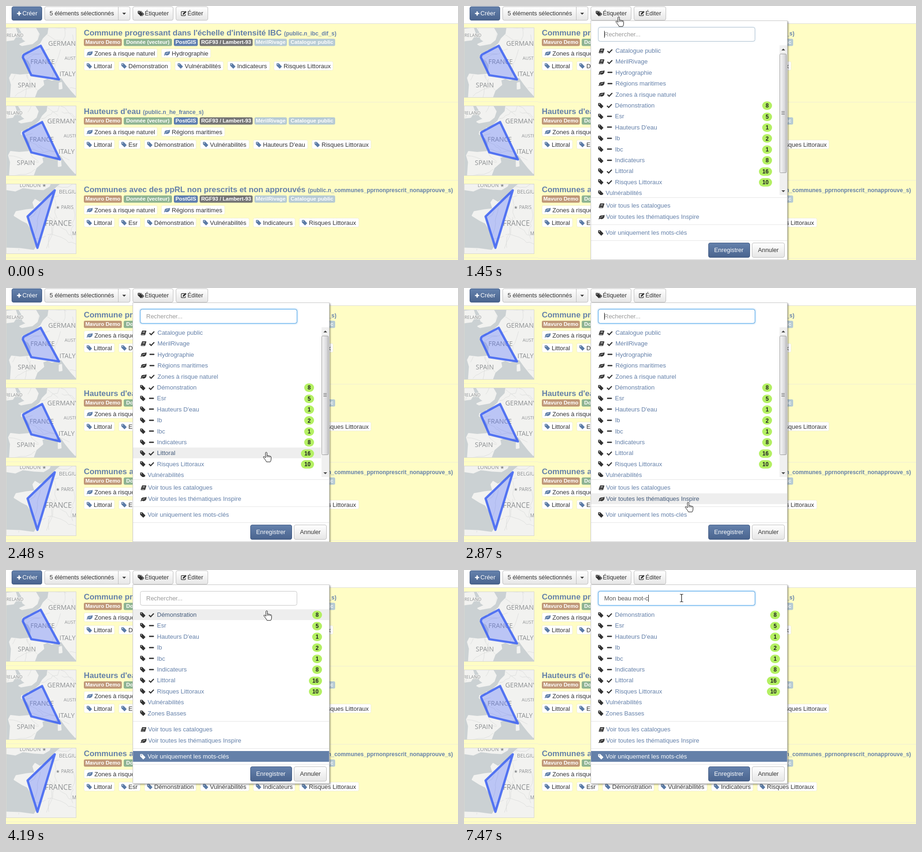
Write an HTML page that moves like this. It is 964 by 543 pixels and loops after 8000 ms.

```html
<!DOCTYPE html>
<html lang="fr">
<head>
<meta charset="utf-8">
<title>Étiqueter</title>
<style>
html, body { margin: 0; width: 100%; height: 100%; overflow: hidden; background: #fff; }
svg { display: block; }
text { font-family: "Liberation Sans", Arial, sans-serif; white-space: pre; }
.map text { font-family: "Open Sans", sans-serif; fill: #8b8e90; stroke: #f4f4f2; stroke-width: 2px; paint-order: stroke; }
</style>
</head>
<body>
<svg id="stage" width="964" height="543" viewBox="0 0 964 543">
  <defs>
    <linearGradient id="light" x2="0" y2="1"><stop stop-color="#fff"/><stop offset="1" stop-color="#e6e6e6"/></linearGradient>
    <linearGradient id="blue" x2="0" y2="1"><stop stop-color="#6481ac"/><stop offset="1" stop-color="#4a648e"/></linearGradient>
    <linearGradient id="thumb"><stop stop-color="#f5f5f5"/><stop offset=".5" stop-color="#e4e4e6"/><stop offset="1" stop-color="#c9c9cc"/></linearGradient>
    <clipPath id="listClip"><rect x="271" y="84" width="418" height="320"/></clipPath>
    <clipPath id="tile"><rect width="150" height="150"/></clipPath>
    <filter id="shadow" x="-5%" y="-5%" width="110%" height="110%"><feDropShadow dx="2" dy="2" stdDeviation="1.6" flood-opacity=".35"/></filter>
    <filter id="glow" x="-5%" y="-30%" width="110%" height="160%"><feGaussianBlur stdDeviation="1.6"/></filter>
  </defs>
  <g id="page"></g>
  <rect id="press" x="270" y="1" width="87" height="30" rx="3.5"/>
  <g id="menu"></g>
  <g id="cursor"></g>
</svg>
<script>
const $ = id => document.getElementById(id);
const LINK = '#6480a9', HOVER = '#435a7a', DARK = '#333', YELLOW = '#fffdc5', LOOP = 8000;

const rect = (x, y, w, h, fill, more = '') =>
  `<rect x="${x}" y="${y}" width="${w}" height="${h}" fill="${fill}" ${more}/>`;
const text = (x, y, s, fill = DARK, size = 13, more = '') =>
  `<text x="${x}" y="${y}" fill="${fill}" font-size="${size}" ${more}>${s}</text>`;
const path = (d, fill, more = '') => `<path d="${d}" fill="${fill}" ${more}/>`;
const line = (x1, x2, y, color) => rect(x1, y, x2 - x1, 1, color);

const pen = document.createElement('canvas').getContext('2d');
pen.font = '13px "Liberation Sans", Arial, sans-serif';
const widthOf = s => pen.measureText(s).width;

// Icons are drawn on a 12 px square centred on cy
const TAG = 'M0 1.6Q0 .6 1 .6H4.8L10.9 6.7Q11.5 7.4 10.9 8L7.4 11.4Q6.8 12 6.1 11.4L0 5.4ZM2.6 2.1A1 1 0 1 0 2.6 4.1 1 1 0 1 0 2.6 2.1Z';
const ICONS = {
  tag: c => path(TAG, c, 'fill-rule="evenodd"'),
  tags: c => path('M6 .6H7.2L13.3 6.8Q13.8 7.4 13.3 8L9.6 11.7 8.6 11.2 12 7.5Z', c) + ICONS.tag(c),
  leaf: c => path('M12.4 1.2C13.4 5.5 11.5 10.2 6.5 10.4 4.6 10.4 3.4 9.9 2.6 9.4 2 10 1.7 11 1 11 .3 11-.2 10.2.2 9.6.6 9 1.3 8.6 1.4 8 .7 5 3 3 6 2.8 9 2.6 10.8 2.8 12.4 1.2Z', c) +
    path('M3.2 8C4.8 6.2 6.5 5.4 9.4 5.3', 'none', 'stroke="#fff" stroke-width=".9"'),
  book: c => path('M3.4 1H11.4Q12.6 1.2 12.2 2.4L10 9.8Q9.7 11 8.6 11H1.6Q0 10.6.5 9Z', c) +
    path('M4.6 3.4H9.6M4 5.2H9M1.6 9.4H8.4', 'none', 'stroke="#fff" stroke-width=".8"'),
  check: c => path('M1 6.4 4.6 9.8 11.2 3', 'none', `stroke="${c}" stroke-width="2.4"`),
  dash: c => rect(1, 4.6, 10.5, 2.6, c, 'rx="1"'),
  plus: c => path('M5 1.5V10.5M.5 6H9.5', 'none', `stroke="${c}" stroke-width="2.7"`),
  edit: c => path('M8 2H2Q.8 2 .8 3.2V9.4Q.8 10.6 2 10.6H8.4Q9.6 10.6 9.6 9.4V7.6', 'none', `stroke="${c}" stroke-width="1.3"`) +
    path('M4 8.4V6.2L9.8.6 12 2.7 6.2 8.4Z', c)
};
const icon = (name, x, cy, color) => `<g transform="translate(${x} ${Math.round(cy - 6)})">${ICONS[name](color)}</g>`;

function button(x, y, w, h, label, tx, blue) {
  const [fill, edge, ink] = blue ? ['url(#blue)', '#3f5880', '#fff'] : ['url(#light)', '#bdbdbd', DARK];
  return rect(x + .5, y + .5, w - 1, h - 1, fill, `rx="3.5" stroke="${edge}"`) +
    text(tx, y + h / 2 + 4, label, ink, 12.8);
}

const toolbar = () => rect(0, 0, 964, 38, '#fff') + line(0, 964, 37, '#ddd') +
  button(12, 1, 65, 30, 'Créer', 35, true) + icon('plus', 23, 16, '#fff') +
  button(82, 1, 183, 30, '5 éléments sélectionnés', 93) + rect(239, 1, 1, 30, '#bdbdbd') +
  path('M248 14.5H256L252 18.5Z', DARK) +
  button(270, 1, 87, 30, 'Étiqueter', 296) + icon('tags', 281, 16, DARK) +
  button(362, 1, 69, 30, 'Éditer', 387) + icon('edit', 373, 16, DARK);

const EUROPE = {
  land: 'M92 0 90 14 80 24 74 35 66 42 58 50 50 50 48 57 36 57 35 62 48 70 54 80 53 100 30 102 12 100 8 108 12 122 10 150H60L66 134 80 122 78 112 88 108 98 112 110 108 118 106 128 120 140 135 150 146V0Z' +
    'M28 0H62L70 14 66 26 56 34 34 38 30 36 44 30 36 24 34 10ZM0 4 20 2 24 14 16 26 0 28ZM114 119 118 118 119 130 114 131Z',
  labels: [[1, 20, 'RELAND', 9.5], [90, 39, 'GERMANY', 14], [52, 78, 'FRANCE', 14], [125, 69, 'AUSTRIA', 9.5], [114, 104, 'ITALY', 14], [25, 128, 'SPAIN', 14]]
};
const CHANNEL = {
  land: 'M150 0H118L104 12 98 24 84 34 72 40 62 34 58 40 62 54 44 56 22 60 18 68 34 78 46 84 56 100 60 118 66 134 60 143 30 139 0 138V150H150ZM0 0V12L20 15 36 8 60 11 80 12 92 5 94 0Z',
  labels: [[29, 7, 'LONDON ★', 10.5], [113, 21, 'BELGIUM', 11], [106, 54, '★ PARIS', 10], [83, 90, 'FRANCE', 15.5], [141, 110, 'MA', 10]]
};

// Faint administrative borders, as seeded wandering lines
function borders(seed) {
  const rnd = () => (seed = seed * 16807 % 2147483647) / 2147483647;
  let d = '';
  for (let i = 0; i < 16; i++) {
    let x = rnd() * 150, y = rnd() * 150;
    const a = rnd() * 6.28;
    d += `M${x} ${y}`;
    for (let k = 0; k < 7; k++) {
      x += 9 * Math.cos(a) + rnd() * 10 - 5;
      y += 9 * Math.sin(a) + rnd() * 10 - 5;
      d += `L${x.toFixed(1)} ${y.toFixed(1)}`;
    }
  }
  return d;
}

function map(i, base, dx, dy, zone) {
  return `<g class="map" transform="translate(0 ${46 + 167 * i})" clip-path="url(#tile)">` +
    rect(0, 0, 150, 150, '#cbd1d3') +
    `<g transform="translate(${dx} ${dy})"><clipPath id="land${i}"><path d="${base.land}"/></clipPath>` +
    path(base.land, '#f2f2f0', 'stroke="#f2f2f0" stroke-width="3" stroke-linejoin="round"') +
    path(borders(i + 41), 'none', `stroke="#dcdddc" stroke-width=".9" clip-path="url(#land${i})"`) +
    base.labels.map(([x, y, s, size]) => text(x, y, s, '', size)).join('') + '</g>' +
    path(zone, '#4a68ff', 'fill-opacity=".33" stroke="#3c62f2" stroke-opacity=".85" stroke-width="4.8" stroke-linejoin="round"') +
    rect(.5, .5, 149, 149, 'none', 'stroke="#d8d8d0"') + '</g>';
}

const BADGES = [
  [166, 81, 'Mavuro Demo', '#bf9878'], [251, 103, 'Donnée (vecteur)', '#8fb492'], [358, 51, 'PostGIS', '#5f7faf'],
  [413, 113, 'RGF93 / Lambert-93', '#757575'], [530, 69, 'MérilRivage', '#b7cbd4'], [603, 99, 'Catalogue public', '#b7cbd4']
];
const RECORDS = [
  { title: "Commune progressant dans l'échelle d'intensité IBC", table: '(public.n_ibc_dif_s)', tableX: 593, end: 704,
    themes: ['Zones à risque naturel', 'Hydrographie'],
    tags: ['Littoral', 'Démonstration', 'Vulnérabilités', 'Indicateurs', 'Risques Littoraux'],
    map: [EUROPE, 0, 0, 'M74 39 38 58Q36 60 36 64L54 102 113 111Z'] },
  { title: "Hauteurs d'eau", table: '(public.n_he_france_s)', tableX: 292, end: 423,
    themes: ['Zones à risque naturel', 'Régions maritimes'],
    tags: ['Littoral', 'Esr', 'Démonstration', 'Vulnérabilités', "Hauteurs D'eau", 'Risques Littoraux'],
    map: [EUROPE, -2, -1.5, 'M77 35 37 57Q36 59 37 61L54 100 115 115Z'] },
  { title: 'Communes avec des ppRL non prescrits et non approuvés', table: '(public.n_communes_pprnonprescrit_nonapprouve_s)', tableX: 644, end: 954,
    themes: ['Zones à risque naturel', 'Régions maritimes'],
    tags: ['Littoral', 'Esr', 'Démonstration', 'Vulnérabilités', 'Indicateurs', 'Risques Littoraux'],
    map: [CHANNEL, 0, 0, 'M104 14 46 70 67 137Z'] }
];
const recordY = i => Math.round(167.5 * i);

function chips(names, kind, cy) {
  const [lead, pad] = kind === 'leaf' ? [22.5, 28] : [21, 27];
  let next = 166;
  return names.map(s => {
    const x = Math.round(next);
    next += widthOf(s) + pad + 8;
    const w = Math.round(next) - x - 8;
    return rect(x + .5, cy - 9.5, w - 1, 19, '#fff', 'rx="3" stroke="#f1efd2"') +
      icon(kind, x + 6, cy, '#5b7ba6') + text(x + lead, cy + 5, s);
  }).join('');
}

function record(r, i) {
  const y = recordY(i), foot = 205 + 167 * i;
  return map(i, ...r.map) +
    `<g id="title${i}" fill="${LINK}" font-weight="bold">` +
    `<text x="166" y="${y + 63}" font-size="16.9">${r.title}</text>` +
    `<text x="${r.tableX}" y="${y + 63}" font-size="11.9">${r.table}</text></g>` +
    BADGES.map(([x, w, s, fill]) => rect(x, y + 70, w, 15.5, fill, 'rx="3"') +
      text(x + w / 2, y + 81.3, s, '#fff', 11.3, 'font-weight="bold" text-anchor="middle"')).join('') +
    chips(r.themes, 'leaf', y + 101) + chips(r.tags, 'tag', y + 128) +
    line(0, 158, foot - 1, '#efedd6') + line(158, 964, foot, '#efedd6');
}

$('page').innerHTML = rect(0, 38, 964, 505, YELLOW) + toolbar() + RECORDS.map(record).join('');

// Menu
const ROWS = [
  ['book', 'check', 'Catalogue public'], ['book', 'check', 'MérilRivage'],
  ['leaf', 'dash', 'Hydrographie'], ['leaf', 'dash', 'Régions maritimes'], ['leaf', 'check', 'Zones à risque naturel'],
  ['tag', 'check', 'Démonstration', 8], ['tag', 'dash', 'Esr', 5], ['tag', 'dash', "Hauteurs D'eau", 1],
  ['tag', 'dash', 'Ib', 2], ['tag', 'dash', 'Ibc', 1], ['tag', 'dash', 'Indicateurs', 8],
  ['tag', 'check', 'Littoral', 16], ['tag', 'check', 'Risques Littoraux', 10],
  ['tag', '', 'Vulnérabilités'], ['tag', '', 'Zones Basses']
];
const LINKS = [['book', 'Voir tous les catalogues', 426.5], ['leaf', 'Voir toutes les thématiques Inspire', 450.5], ['tag', 'Voir uniquement les mots-clés', 484.5]];
const OPEN = 1450, FILTERED = 3490, REFOCUS = 4900, PITCH = 23.4;
const TYPED = [5680, 5910, 5990, 6230, 6380, 6460, 6610, 6610, 6770, 7000, 7075, 7150, 7390, 7470];
const PHRASE = 'Mon beau mot-c';

const rowY = i => 95.6 + i * PITCH;
const over = (x, y, cy) => x > 271 && x < 689 && Math.abs(y - cy) <= 11.7;

function menuRow([kind, mark, name, count], i, right, hover) {
  const cy = rowY(i), shift = kind === 'tag' ? 0 : 1;
  let s = hover ? rect(271, Math.round(cy - 11.7), right - 271, 23, '#eee') : '';
  s += icon(kind, 286 + shift, cy, DARK);
  if (mark) s += icon(mark, 304 + shift, cy, DARK);
  s += text((mark ? 322 : 302) + shift, Math.round(cy + 4.4), name, hover ? HOVER : LINK);
  if (count) {
    const w = count > 9 ? 28 : 21, x = right - 15 - w;
    s += rect(x, Math.round(cy - 8.3), w, 18, '#b4f063', 'rx="9"') +
      text(x + w / 2, Math.round(cy + 4.8), count, '#222', 12, 'font-weight="bold" text-anchor="middle"');
  }
  return s;
}

function field(t) {
  const focusAt = t < FILTERED ? OPEN : REFOCUS;
  const focused = t < FILTERED || t >= REFOCUS;
  const glow = focused ? Math.min(1, (t - focusAt + 40) / 200) : 0;
  const count = TYPED.filter(k => k <= t).length;
  const since = count ? TYPED[count - 1] : focusAt;
  const typed = PHRASE.slice(0, count);
  const caret = focused && Math.floor((t - since) / 535) % 2 === 0;
  const box = 'x="286.5" y="45.5" width="334" height="30" rx="4"';
  return `<rect ${box} fill="none" stroke="#52a8ec" stroke-width="3" opacity="${.5 * glow}" filter="url(#glow)"/>` +
    `<rect ${box} fill="#fff" stroke="#c4c4c4"/><rect ${box} fill="none" stroke="#52a8ec" opacity="${glow}"/>` +
    (count ? text(299, 65, typed, '#555') : text(299, 65, 'Rechercher...', '#999')) +
    (caret ? rect(Math.round(299 + widthOf(typed)), 53, 1, 15, '#222') : '');
}

const scrollbar = () => rect(673, 84, 16, 320, '#f0f0f0') +
  path('M677 95H685L681 91ZM677 394H685L681 398Z', '#444') +
  rect(673.5, 102.5, 14, 254, 'url(#thumb)', 'rx="2" stroke="#989898"') +
  [225, 228, 231].map(y => line(677, 684, y, '#666')).join('');

function menuFoot(full, lift, x, y) {
  let s = [409, 467, 501].map(v => line(271, 689, v, '#e5e5e5')).join('');
  LINKS.forEach(([kind, name, cy], i) => {
    const active = !full && i === 2, hover = over(x, y + lift, cy);
    if (active || hover) s += rect(271, cy - 11.5, 418, 23, active ? LINK : '#eee');
    s += icon(kind, kind === 'tag' ? 286 : 287, cy, active ? '#fff' : DARK) +
      text(kind === 'tag' ? 302 : 303, cy + 4.5, name, active ? '#fff' : hover ? HOVER : LINK);
  });
  return `<g transform="translate(0 ${-lift})">${s}` +
    button(521, 506, 89, 32, 'Enregistrer', 533.5, true) + button(614, 506, 70, 32, 'Annuler', 627) + '</g>';
}

function menu(t, x, y) {
  const full = t < FILTERED, lift = full ? 0 : 86, right = full ? 672 : 689;
  const rows = full ? ROWS : ROWS.slice(5);
  return rect(270.5, 31.5, 419, 511 - lift, '#fff', 'stroke="#c8c8c8" filter="url(#shadow)"') + field(t) +
    '<g clip-path="url(#listClip)">' +
    rows.map((r, i) => menuRow(r, i, right, y < 404 && x < right && over(x, y, rowY(i)))).join('') + '</g>' +
    (full ? scrollbar() : '') + menuFoot(full, lift, x, y);
}

// Pointer
const TRACK = [
  [150, 520, 453], [850, 330, 23], [1700, 330, 23], [2000, 550, 189], [2550, 556, 374], [2600, 556, 374],
  [2870, 478, 458], [3300, 498, 485], [3430, 500, 477], [3490, 500, 477], [4190, 557, 87], [4260, 488, 67], [4490, 464, 60]
];
function pointer(t) {
  const k = TRACK.findIndex(p => p[0] > t);
  if (k <= 0) return TRACK[k < 0 ? TRACK.length - 1 : 0].slice(1);
  const [a, b] = [TRACK[k - 1], TRACK[k]], f = (t - a[0]) / (b[0] - a[0]);
  return [a[1] + (b[1] - a[1]) * f, a[2] + (b[2] - a[2]) * f];
}
const CURSORS = {
  arrow: path('M0 0V16L3.7 12.6 6.3 18.5 8.7 17.4 6.2 11.8H11.3Z', '#fff', 'stroke="#111"'),
  hand: path('M-1.6 1Q0-1.2 1.6 1V7.4Q3.2 6 4.6 7.8 6.2 6.8 7.6 8.6 9.8 8 10.4 10.2V15Q10.4 18 8.6 20.8H.6Q-.6 18-3 15L-6 11.2Q-6.4 8.8-4.2 9.4L-1.6 12ZM1.6 7.4V11M4.6 7.8V11M7.6 8.6V11.4', '#fff', 'stroke="#111" stroke-linejoin="round"'),
  beam: path('M-3.5-8H-1L0-7 1-8H3.5M0-7V7M-3.5 8H-1L0 7 1 8H3.5', 'none', 'stroke="#111" stroke-width="1.2"')
};
function cursorKind(t, x, y, title) {
  if (t < OPEN) return title >= 0 || (y < 31 && x > 270 && x < 357) ? 'hand' : 'arrow';
  if (y < 31) return 'hand';
  const lift = t < FILTERED ? 0 : 86;
  if (y > 45 && y < 76) return 'beam';
  const onList = y > 84 && y < (lift ? 318 : 404);
  return onList || LINKS.some(l => over(x, y + lift, l[2])) ? 'hand' : 'arrow';
}

let shown = '';
function draw(t) {
  const [x, y] = pointer(t);
  const title = t < 150 || t >= OPEN ? -1 :
    RECORDS.findIndex((r, i) => x > 166 && x < r.end && Math.abs(y - 57 - recordY(i)) < 11);
  RECORDS.forEach((r, i) => $('title' + i).setAttribute('fill', i === title ? HOVER : LINK));
  $('press').setAttribute('opacity', t < 990 || t >= OPEN ? 0 : t < 1160 ? .06 : .1);
  const markup = t < OPEN ? '' : menu(t, x, y);
  if (markup !== shown) $('menu').innerHTML = shown = markup;
  $('cursor').innerHTML = t < 150 ? '' :
    `<g transform="translate(${Math.round(x)} ${Math.round(y)})">${CURSORS[cursorKind(t, x, y, title)]}</g>`;
}
function tick() {
  draw(performance.now() % LOOP);
  requestAnimationFrame(tick);
}
tick();
</script>
</body>
</html>
```
